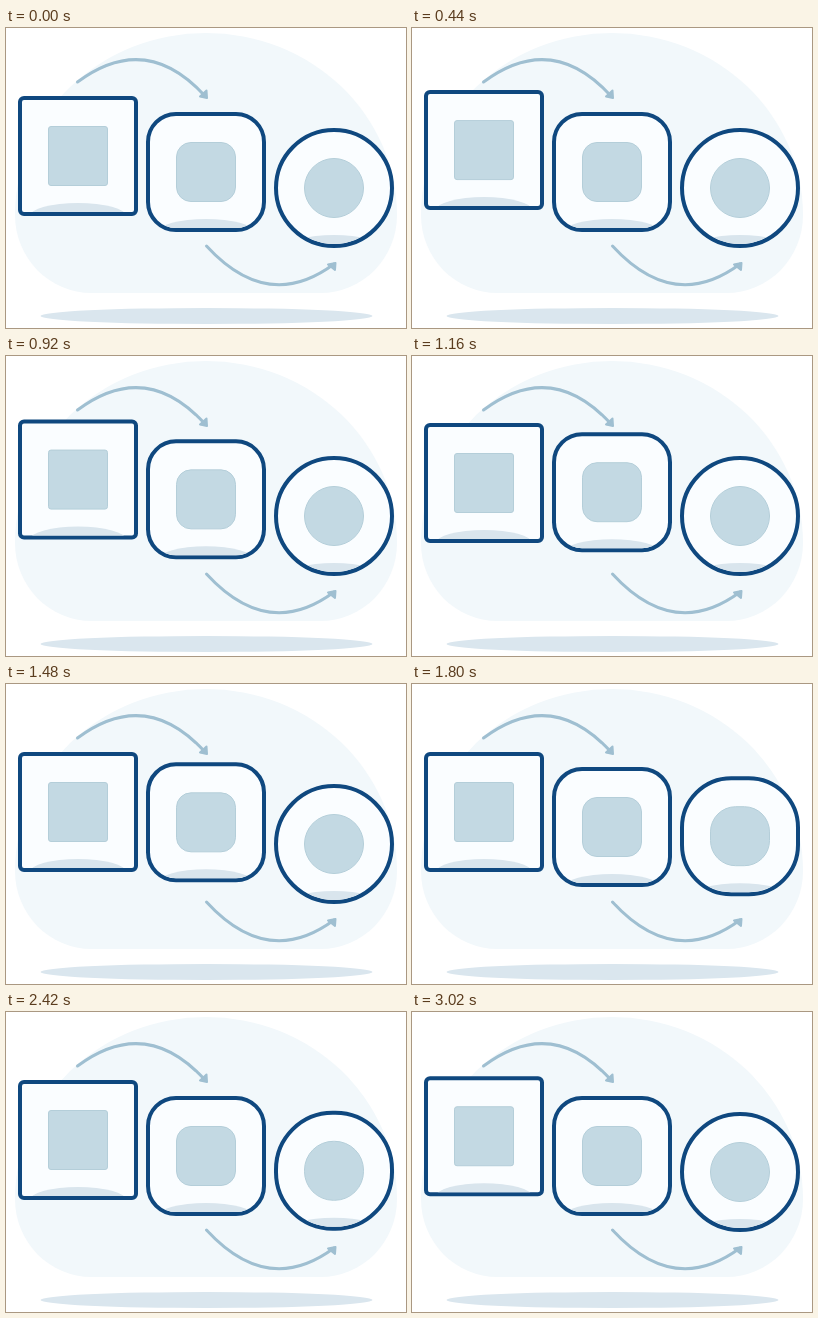
Animation of 400 by 300 pixels, one loop 3040 ms. Source, as an HTML page:

```html
<!DOCTYPE html>
<html lang="en">
<head>
<meta charset="utf-8">
<title>Morphing cards</title>
<style>
  html, body { margin: 0; width: 100%; height: 100%; overflow: hidden; background: #fff; }
  * , ::before, ::after { box-sizing: border-box; }
  body > *, .card::before, .card::after { position: absolute; }
  .blob {
    left: 9px; top: 5px; width: 382px; height: 260px; background: #f2f8fb;
    border-radius: 50% 50% 20% 20% / 70% 70% 30% 30%;
  }
  svg { left: 0; top: 0; }
  .card {
    width: 120px; height: 120px; overflow: hidden;
    background: #fafdff; border: 4px solid #0f487f; border-radius: var(--r);
  }
  .card::before {
    content: ""; left: 26px; top: 26px; width: 60px; height: 60px;
    background: #c3d9e3; border: 1px solid #b4ced9; border-radius: calc(var(--r) / 2);
  }
  .card::after {
    content: ""; left: 8px; top: 103px; width: 96px; height: 26px;
    background: #d9e5ed; border-radius: 50%;
  }
</style>
</head>
<body>
<div class="blob"></div>
<svg width="400" height="300" fill="none" stroke="#9fbfd1" stroke-width="3" stroke-linecap="round" stroke-linejoin="round">
  <ellipse cx="200.5" cy="288" rx="166" ry="8" fill="#dae6ee" stroke="none"/>
  <path d="M71.5 54Q140 3 199 68M200.500 218Q262 285 328 236"/>
  <path d="M201 70L194 68.500L200.500 62.500ZM329.500 235L322 236.500L329 242Z" fill="#9fbfd1" stroke-width="2"/>
</svg>
<script>
  const LOOP = 3040, DELAY = 220, CYCLE = 2640, STAGGER = 640, HOP = 1120, PEAK = 336, LIFT = 8;

  // x, y, resting radius, radius at the top of the hop
  const cards = [[12, 68, 6, 6], [140, 84, 30, 30], [268, 100, 60, 51]].map(([x, y, r0, r1]) => {
    const el = document.createElement("div");
    el.className = "card";
    el.style.left = x + "px";
    el.style.top = y + "px";
    document.body.append(el);
    return { el, r0, r1 };
  });

  const ease = p => (1 - Math.cos(Math.PI * p)) / 2;

  function hop(t) {
    if (t <= 0 || t >= HOP) return 0;
    return t < PEAK ? ease(t / PEAK) : 1 - ease((t - PEAK) / (HOP - PEAK));
  }

  const start = performance.now();

  function draw() {
    const t = (performance.now() - start) % LOOP - DELAY;
    cards.forEach(({ el, r0, r1 }, i) => {
      const h = hop(t % CYCLE - i * STAGGER);
      el.style.transform = `translateY(${-LIFT * h}px)`;
      el.style.setProperty("--r", r0 + (r1 - r0) * h + "px");
    });
    requestAnimationFrame(draw);
  }
  draw();
</script>
</body>
</html>
```
